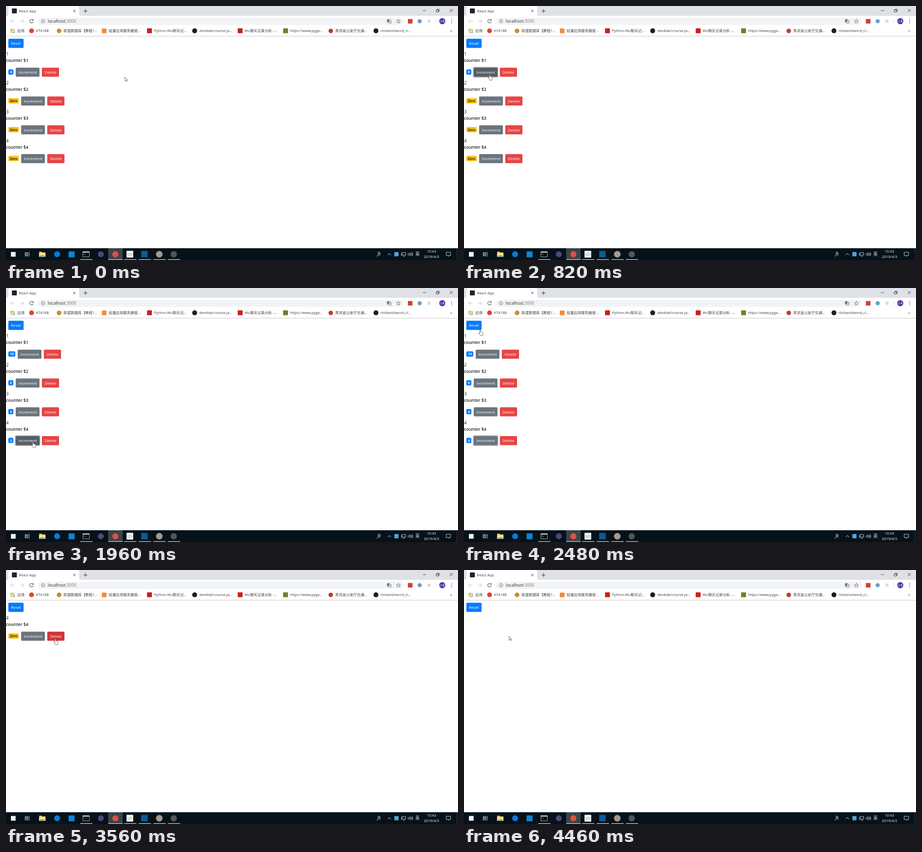
These frames come from a looping animation (920 px wide and 518 px high, 4.48 s). An HTML page:

```html
<!DOCTYPE html>
<html lang="zh">
<head>
<meta charset="utf-8">
<title>React App</title>
<style>
html, body { margin: 0; width: 100%; height: 100%; overflow: hidden; background: #fff; }
svg { display: block; width: 920px; height: 518px; font-family: "Open Sans", "Noto Sans CJK SC", "Noto Sans CJK", sans-serif; }
text { white-space: pre; }
.line { fill: none; stroke-linecap: round; stroke-linejoin: round; }
</style>
</head>
<body>
<svg id="stage" viewBox="0 0 920 518">
  <rect width="920" height="518" fill="#fff"/>
  <g id="page"></g>
  <g id="chrome"></g>
  <g id="taskbar"></g>
  <g id="cursor"></g>
</svg>
<script>
const LOOP = 4480;
const $ = id => document.getElementById(id);

const rect = (x, y, w, h, fill, r = 0, more = '') =>
  `<rect x="${x}" y="${y}" width="${w}" height="${h}" rx="${r}" fill="${fill}" ${more}/>`;
const dot = (x, y, r, fill) => `<circle cx="${x}" cy="${y}" r="${r}" fill="${fill}"/>`;
const line = (d, color, w = 0.9) => `<path class="line" d="${d}" stroke="${color}" stroke-width="${w}"/>`;
const text = (x, y, s, size, fill, more = '') =>
  `<text x="${x}" y="${y}" font-size="${size}" fill="${fill}" ${more}>${s}</text>`;
const MID = 'text-anchor="middle"';

function drawChrome() {
  const ink = '#5f6368', dark = '#3c4043', pale = '#c4c6c9';
  let s = rect(0, 0, 920, 20, '#dee1e6') + rect(0, 20, 920, 41, '#fff');
  // tab strip
  s += '<path d="M1 20Q5 20 5 16V4Q5 0 9 0H145Q149 0 149 4V16Q149 20 153 20Z" fill="#fff"/>';
  s += rect(12, 5, 10, 10, '#20232a', 1) + text(26.6, 13, 'React App', 7.4, dark);
  s += line('M137 8l4.2 4.2M141.2 8l-4.2 4.2', dark);
  s += line('M158.4 10.2h6.8M161.8 6.8v6.8', dark, 1.1);
  s += line('M849 9.3h5.6', '#222', 0.8);
  s += line('M876 8h4.2v4.2h-4.2zM877.4 8V6.6h4.2v4.2h-1.4', '#222', 0.8);
  s += line('M903.6 6.4l5.4 5.4M909 6.4l-5.4 5.4', '#222', 0.8);
  // toolbar
  s += line('M17.2 31H9.6M13 27.4L9.4 31l3.6 3.6', pale, 1);
  s += line('M28.6 31h7.6M32.8 27.4l3.6 3.6l-3.6 3.6', pale, 1);
  s += line('M55 28.7A3.7 3.7 0 1 0 55.5 32.2M55.5 27.2v2.3h-2.4', ink, 1.1);
  s += rect(65, 24, 744, 14.4, '#f1f3f4', 7.2);
  s += `<circle cx="75.5" cy="31" r="3.4" fill="none" stroke="${ink}" stroke-width=".8"/>`;
  s += line('M75.5 30.7v1.9M75.5 29.2v.1', ink, 0.8);
  s += text(85, 34, `localhost<tspan fill="#777b80">:3000</tspan>`, 8.6, '#2c2f33');
  s += rect(775.5, 27, 5.4, 6.6, '#70757a', 0.8) + rect(779, 29, 5, 6.4, '#fff', 0.8, `stroke="${ink}" stroke-width=".7"`);
  s += line('M780.1 31h2.8M781.5 30.3v.7M782.5 31q-.4 1.7-2 2.6M780.6 31.8l2.2 1.8', ink, 0.5);
  s += line('M798.7 27l1.2 2.7 2.9.3-2.2 1.9.7 2.9-2.6-1.5-2.6 1.5.7-2.9-2.2-1.9 2.9-.3z', ink, 0.8);
  s += rect(818, 26.5, 9.4, 9.2, '#d3412f', 0.6) + dot(842, 31, 4.3, '#6c9cc9') + dot(861, 31, 3.4, '#dcdcde');
  s += rect(874, 26, 0.8, 10, '#dadce0') + dot(888, 31, 6.2, '#512da8');
  s += text(888, 33.2, '小禾', 5.4, '#fff', MID);
  for (const y of [27.7, 31, 34.3]) s += dot(907, y, 0.9, ink);
  // bookmarks
  const grid = ['#db4437', '#0f9d58', '#f4b400'];
  for (let i = 0; i < 9; i++)
    s += rect(9.6 + (i % 3) * 3.1, 46.7 + (i / 3 | 0) * 3.1, 2, 2, grid[(i + (i / 3 | 0)) % 3], 0.4);
  s += dot(52, 50.6, 4.9, '#e6402f') + dot(108, 50.8, 4.7, '#c98a35') + rect(195, 46, 9.6, 9.4, '#f58a3c', 1);
  for (const x of [287, 471.6]) s += rect(x, 45.6, 10, 10, '#c9201f', 1);
  for (const x of [384, 753]) s += dot(x, 50.6, 5, '#1b1f23');
  s += rect(564, 45.6, 10, 10, '#7d7a2b', 1) + dot(661, 50.8, 4.6, '#bd3c2c');
  const marks = [
    [23, '应用'], [61, 'KT418B'], [117, '新建数据库【教程1...'], [209, '轻量应用服务器管...'],
    [301.4, 'Python-Wu聊天记...'], [393.6, 'dev4lab/course-ja...'], [485.6, 'Wu聊天记录分析 -...'],
    [578, 'https://www.pyga...'], [670, '青岚省公安厅交通...'], [762.4, 'rtolland/word_cl...']
  ];
  for (const [x, label] of marks) s += text(x, 53.3, label, 7.4, dark);
  s += text(904.2, 52.8, '»', 8, dark);
  s += rect(0, 61, 920, 1, '#cccdd0');
  $('chrome').innerHTML = s;
}

function drawTaskbar() {
  const w = '#f0f3f5';
  let s = rect(0, 494, 920, 24, '#06121a') + rect(208, 494, 29.5, 24, '#39444b');
  s += rect(10, 501.6, 9.6, 9.6, w);
  s += line('M39.2 502v1.6h5V502M39.2 510.6v-1.6h5v1.6M39.2 504.8h5v2.8h-5zM47 502v8.6M46.6 505h.8', w, 0.8);
  // folder
  s += '<path d="M67.5 501h4.8l1.2 1.5h6.7v8.8H67.5z" fill="#f2c55c"/>' + rect(67.5, 504, 12.7, 7.3, '#ffe298');
  s += '<path d="M70 511.5v-3h7.8v3h-2v-1.4h-3.8v1.4z" fill="#3f9bdc"/>';
  s += dot(104, 506.3, 6, '#0a7bd8') + rect(127.4, 500.4, 12.2, 12.2, '#1583cf', 1);
  // console window
  s += rect(156.5, 501, 13, 10.4, '#050505', 0, 'stroke="#c9ced2" stroke-width=".8"') + rect(156.5, 501, 13, 1.9, '#d8dcdf');
  s += line('M158.6 504.6l1.4 1-1.4 1M161 506.8h2', '#e4e4e4', 0.6);
  s += dot(193, 506.3, 6, '#50467f') + dot(222.6, 506.3, 6.2, '#dd5144');
  s += rect(245.3, 499.3, 13.6, 13.8, '#f7f9f7');
  s += line('M249.6 504l-2.3 2.3 2.3 2.3M254.6 504l2.3 2.3-2.3 2.3M253 503.4l-1.8 5.8', '#4e9e6a', 0.9);
  s += rect(275.2, 499.6, 13.2, 13, '#0b5c94') + dot(312, 506.3, 6.7, '#a9988b') + dot(341.4, 506.3, 6.4, '#50575c');
  for (const [x, wide] of [[151, 25], [208, 29.5], [240.4, 25], [270, 25], [300, 25], [329.4, 25]])
    s += rect(x, 516.4, wide, 1.6, '#76b9ed');
  // tray
  s += line('M755.4 510.6q.4-3.6 3.4-3.8q2.4.2 2.8 2.2M760.8 503.6a1.9 1.9 0 1 1-3.8 0a1.9 1.9 0 1 1 3.8 0M761 506.2l1.6-1.6', w, 0.9);
  s += line('M777.2 507.8l3.2-3.2 3.2 3.2', w, 0.9);
  s += rect(790.4, 501.8, 8.6, 8.8, '#4fa4de', 1);
  s += line('M806.4 502.8h7v5.2h-7zM808.2 510.4h3.6M805 504.4v4.8', w, 0.8);
  s += line('M818.6 505h1.6l2.2-2v6.6l-2.2-2h-1.6zM824 504.8q1 1.5 0 3M825.6 503.6q1.8 2.7 0 5.4M827 502.6q2.2 3.7 0 7.4', w, 0.7);
  s += text(837.6, 509.2, '英', 8.6, w, MID);
  s += text(866, 503.4, '10:43', 7.3, w, MID) + text(866, 514.4, '2019/4/3', 7.5, w, MID);
  s += line('M896.4 502.2h8.6v6.6h-3l-1.5 1.8v-1.8h-4.1z', w, 0.8);
  s += rect(917.4, 494, 0.6, 24, '#4b555b');
  $('taskbar').innerHTML = s;
}

// cursor waypoints: time, x, y
const PATH = [
  [0, 242, 145], [100, 232, 146], [340, 62, 140], [440, 52, 139.6], [990, 52, 139.8],
  [1060, 53, 198], [1300, 54, 199], [1390, 62, 257], [1540, 65.6, 260.4], [1720, 63, 259],
  [1820, 55, 314], [2140, 55, 314], [2400, 33, 92], [2480, 33, 85.6], [2560, 27, 79],
  [2760, 27, 79], [2960, 98, 138], [3100, 102.8, 141], [3560, 100.4, 140.6], [3760, 100, 140],
  [4000, 95, 137], [4460, 91.5, 135], [4480, 91.5, 135]
];
// clicks: time, action, counter
const CLICKS = [];
const add = (id, ...times) => times.forEach(t => CLICKS.push([t, 'inc', id]));
add(1, 500, 600, 700, 800, 880, 960);
add(2, 1080, 1130, 1180, 1230, 1280);
add(3, 1420, 1500, 1600, 1680);
add(4, 1860, 1940, 2020, 2100);
CLICKS.push([2640, 'reset', 0]);
[3200, 3340, 3480, 3680].forEach((t, i) => CLICKS.push([t, 'del', i + 1]));

function cursorAt(t) {
  let i = 0;
  while (i < PATH.length - 2 && PATH[i + 1][0] <= t) i++;
  const [t0, x0, y0] = PATH[i], [t1, x1, y1] = PATH[i + 1];
  const u = (t - t0) / (t1 - t0), k = u * u * (3 - 2 * u);
  return [x0 + (x1 - x0) * k, y0 + (y1 - y0) * k];
}

function stateAt(t) {
  let counters = [1, 2, 3, 4].map(id => ({ id, n: id === 1 ? 4 : 0 }));
  let focus = '';
  for (const [at, action, id] of CLICKS) {
    if (at > t) break;
    focus = action + id;
    if (action === 'inc') counters.find(c => c.id === id).n++;
    if (action === 'reset') counters.forEach(c => c.n = 0);
    if (action === 'del') counters = counters.filter(c => c.id !== id);
  }
  return { counters, focus };
}

const KINDS = {
  reset: { label: 'Reset', w: 31, fill: '#007bff', hover: '#0069d9', ring: '#80bdff' },
  inc: { label: 'Increment', w: 48.4, fill: '#6c757d', hover: '#565f65', ring: '#b5babe' },
  del: { label: 'Delete', w: 35, fill: '#e64545', hover: '#d23434', ring: '#f0a0a0' }
};
const GAP = 4.8, BTN_H = 18.6, PITCH = 58.75;

const ARROW = '<path d="M0 0V8.1L1.9 6.4 3.2 9.3 4.5 8.7 3.2 5.9H5.7Z" fill="#fff" stroke="#222" stroke-width=".6"/>';
const HAND = '<path d="M-.9 6.9V.6Q-.9-.3 0-.3T.9.6V4Q1.3 3.4 2 3.6T2.7 4.3Q3.2 3.8 3.8 4.1T4.4 4.9Q5.6 4.6 5.6 5.9V8Q5.6 9.4 4.8 10.3V11.6H.2V10.5L-2.6 7Q-3.2 6-2.4 5.6T-.9 6.9Z" fill="#fff" stroke="#222" stroke-width=".6"/>';

function render(t) {
  const [mx, my] = cursorAt(t);
  const { counters, focus } = stateAt(t);
  let over = false;
  const button = (kind, id, x, y) => {
    const b = KINDS[kind];
    const inside = pad => mx >= x && mx <= x + b.w && my >= y && my <= y + BTN_H + pad;
    // the hand appears a touch before the darker fill
    over = over || inside(0.6);
    const ring = focus === kind + id ? rect(x - 1.7, y - 1.7, b.w + 3.4, BTN_H + 3.4, b.ring, 3.2) : '';
    return ring + rect(x, y, b.w, BTN_H, inside(0) ? b.hover : b.fill, 1.9) +
      text(x + b.w / 2, y + 12.5, b.label, 7.85, '#fff', MID);
  };
  let s = button('reset', 0, GAP, 66.8);
  counters.forEach(({ id, n }, i) => {
    const y = 125.7 + PITCH * i;
    const bw = n === 0 ? 21.2 : n < 10 ? 10.2 : 14.2;
    const x = GAP + bw + GAP;
    s += text(0.2, y - 24.4, id, 9, '#212529');
    s += text(0, y - 11.4, 'counter $' + id, 8.8, '#212529', 'font-weight="600"');
    s += rect(GAP, y + 3.5, bw, 10.9, n ? '#007bff' : '#ffc107', 2.3);
    s += text(GAP + bw / 2, y + 11.6, n || 'Zero', 6.9, n ? '#fff' : '#212529', MID + ' font-weight="700"');
    s += button('inc', id, x, y) + button('del', id, x + KINDS.inc.w + GAP, y);
  });
  $('page').innerHTML = s;
  $('cursor').innerHTML = over ? HAND : ARROW;
  $('cursor').setAttribute('transform', `translate(${mx.toFixed(2)} ${my.toFixed(2)})`);
}

drawChrome();
drawTaskbar();
const start = performance.now();
function tick() {
  const t = (performance.now() - start) % LOOP;
  render(Math.floor(t / 20) * 20);
  requestAnimationFrame(tick);
}
tick();
</script>
</body>
</html>
```
